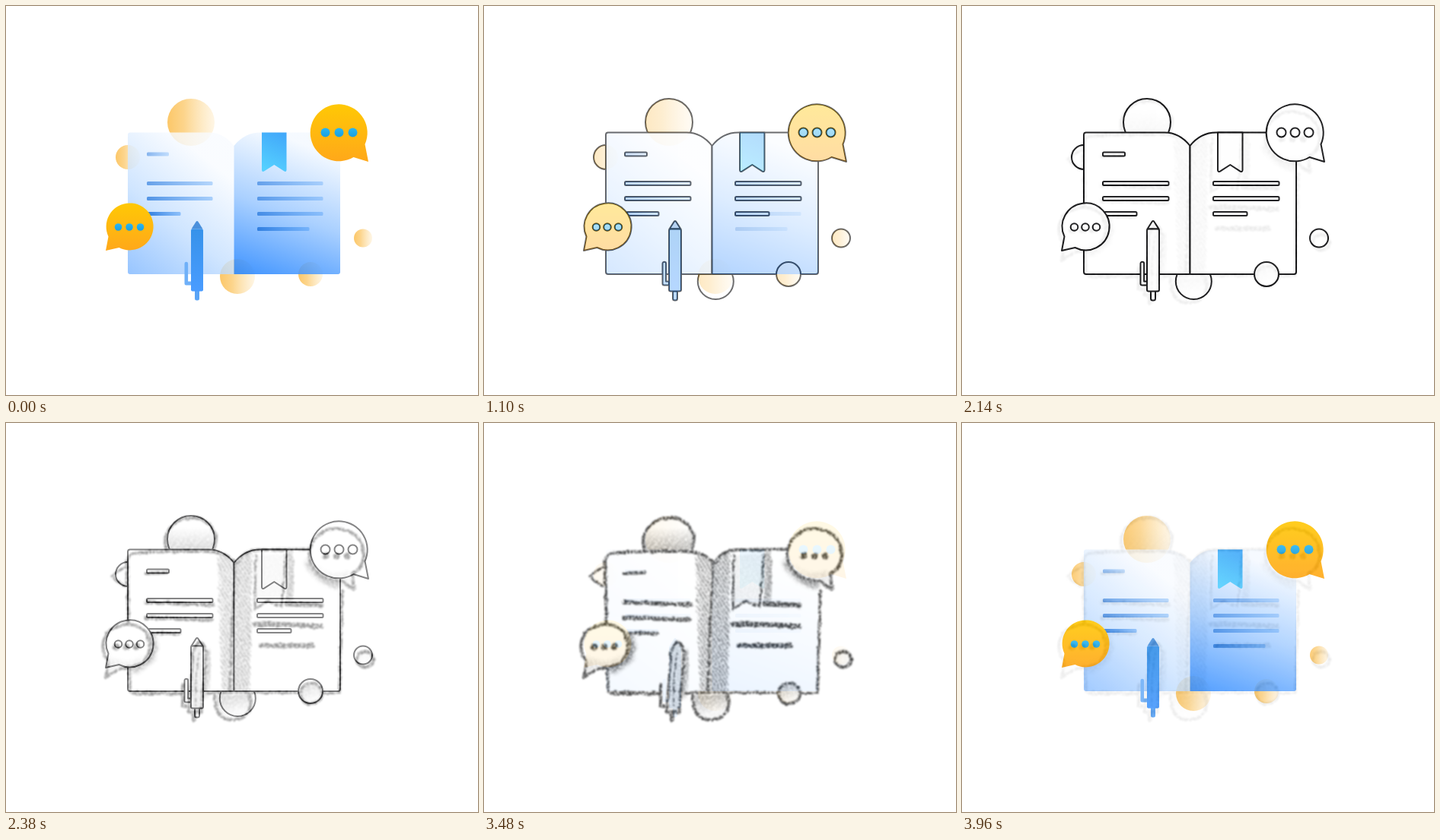
An HTML page that plays this animation: 620x512 px, repeating every 4.02 s.

```html
<!DOCTYPE html>
<html lang="en">
<head>
<meta charset="utf-8">
<title>Notebook: colour, outline, pencil</title>
<style>
  html, body { margin: 0; width: 100%; height: 100%; overflow: hidden; background: #fff; }
  svg { display: block; width: 100vw; height: 100vh; }
  .bg { fill: #fff; stroke: none; }

  #outline, #pencil { animation: 4020ms linear infinite; }
  #outline { animation-name: outline; }
  #pencil { animation-name: pencil; }

  /* each dissolve: nine 60 ms steps from 10% to 90% */
  @keyframes outline {
    0% { opacity: 0; }
    19.9% { opacity: 0; animation-timing-function: steps(9, jump-both); }
    33.333% { opacity: 1; }
    70% { opacity: 1; animation-timing-function: step-end; }
    70.01%, 100% { opacity: 0; }
  }
  @keyframes pencil {
    0% { opacity: 0; }
    53.233% { opacity: 0; animation-timing-function: steps(9, jump-both); }
    66.666% { opacity: 1; }
    86.567% { opacity: 1; animation-timing-function: steps(9, jump-both); }
    100% { opacity: 0; }
  }

  #outline { fill: #fff; stroke: #0c0c0e; stroke-width: 2; stroke-linejoin: round; }
  #pencil { fill: #fff; stroke: #2b2b2b; stroke-width: 4; stroke-linecap: round; stroke-linejoin: round; }
  #pencil .open { fill: none; }
  #pencil .dots { fill: #2b2b2b; stroke: none; }
  #pencil .tone { fill: #777; stroke: none; }
  #pencil .shade { fill: none; stroke: #4a4a4a; }
</style>
</head>
<body>
<svg viewBox="0 0 620 512">
  <defs>
    <linearGradient id="sun">
      <stop stop-color="#fcc768"/><stop offset=".35" stop-color="#fcd285" stop-opacity=".95"/>
      <stop offset="1" stop-color="#fde0a8" stop-opacity=".3"/>
    </linearGradient>
    <linearGradient id="paperL" gradientUnits="userSpaceOnUse" x1="165" y1="358" x2="280" y2="215">
      <stop stop-color="#7db6ff"/><stop offset=".5" stop-color="#c4dfff"/><stop offset="1" stop-color="#f8fbff"/>
    </linearGradient>
    <linearGradient id="paperR" gradientUnits="userSpaceOnUse" x1="322" y1="356" x2="386" y2="180">
      <stop stop-color="#2384ff"/><stop offset=".5" stop-color="#9bc8ff"/><stop offset="1" stop-color="#f4f9ff"/>
    </linearGradient>
    <linearGradient id="bar">
      <stop stop-color="#2878dc"/><stop offset="1" stop-color="#4a9af5" stop-opacity=".55"/>
    </linearGradient>
    <linearGradient id="amber" x2="0" y2="1">
      <stop stop-color="#ffc805"/><stop offset="1" stop-color="#ffa81a"/>
    </linearGradient>
    <linearGradient id="ribbon" x1=".7" x2=".4" y2="1">
      <stop stop-color="#42a9fa"/><stop offset="1" stop-color="#55d0ff"/>
    </linearGradient>
    <linearGradient id="ink" x2="0" y2="1">
      <stop stop-color="#3692ea"/><stop offset="1" stop-color="#4a9cff"/>
    </linearGradient>
    <linearGradient id="aqua" x2="0" y2="1">
      <stop stop-color="#27b6f4"/><stop offset="1" stop-color="#1c9fdc"/>
    </linearGradient>
    <linearGradient id="dusk" x2="0" y2="1">
      <stop offset=".3" stop-color="#fff"/><stop offset="1" stop-color="#a5a5a5"/>
    </linearGradient>
    <linearGradient id="dawn" x2=".3" y2="1">
      <stop stop-color="#8f8f8f"/><stop offset=".8" stop-color="#f2f2f2"/>
    </linearGradient>
    <pattern id="hatch" width="4" height="9" patternUnits="userSpaceOnUse" patternTransform="rotate(-32)">
      <path d="M1.6 0V9" stroke="#555" stroke-width="1.3"/>
    </pattern>

    <path id="pageL" d="M299.5 184C290 172 279 166.500 266 166.500H163a3 3 0 0 0-3 3V350a3 3 0 0 0 3 3H299.500Z"/>
    <path id="pageR" d="M299.500 184C309 172 321 166.500 334 166.500H436a3 3 0 0 1 3 3V350a3 3 0 0 1-3 3H299.500Z"/>
    <path id="mark" d="M336 166.500H368.500V216q-.3 3-3 1.600L352.300 209 339 217.600q-2.700 1.400-3-1.600Z"/>
    <path id="bubbleR" d="M471.500 182L476 205 456.500 199A37.500 37.500 0 1 1 471.500 182Z"/>
    <path id="bubbleL" d="M134.500 303.500L131 322 148.500 318A31 31 0 1 0 134.500 303.500Z"/>
    <g id="dotsR"><circle cx="419.500" cy="166.500" r="6"/><circle cx="437.500" cy="166.500" r="6"/><circle cx="455.500" cy="166.500" r="6"/></g>
    <g id="dotsL"><circle cx="147.500" cy="291" r="4.800"/><circle cx="162" cy="291" r="4.800"/><circle cx="176.500" cy="291" r="4.800"/></g>
    <path id="clip" d="M234.500 339a2.300 2.300 0 0 1 4.600 0V362.500H243V367.500H236.500a2 2 0 0 1-2-2Z"/>
    <path id="nub" d="M248 375H254V385a2.500 2.500 0 0 1-2.500 2.500h-1a2.500 2.500 0 0 1-2.500-2.500Z"/>
    <path id="tip" d="M243.500 293.500L249.500 284q1.500-2 3 0L258.500 293.500Z"/>
    <rect id="body" x="243" y="293.500" width="16" height="82" rx="2"/>
    <rect id="long" width="86.500" height="5" rx="1.500"/>
    <rect id="mid" width="44.500" height="5" rx="1.500"/>
    <rect id="short" width="29" height="5" rx="1.500"/>

    <filter id="graphite" filterUnits="userSpaceOnUse" x="110" y="105" width="395" height="305" color-interpolation-filters="sRGB">
      <feTurbulence type="fractalNoise" baseFrequency=".11" numOctaves="2" seed="4" result="warp"/>
      <feDisplacementMap in="SourceGraphic" in2="warp" scale="4" xChannelSelector="R" yChannelSelector="G" result="line"/>
      <feTurbulence type="fractalNoise" baseFrequency=".45" numOctaves="2" seed="9"/>
      <feColorMatrix values="0 0 0 0 1  0 0 0 0 1  0 0 0 0 1  0 0 0 4 -1.800" result="grain"/>
      <feMerge><feMergeNode in="line"/><feMergeNode in="grain"/></feMerge>
      <feGaussianBlur stdDeviation=".8"/>
    </filter>
    <filter id="soft" x="-60%" y="-30%" width="220%" height="160%"><feGaussianBlur stdDeviation="2.500"/></filter>
  </defs>

  <g id="colour">
    <rect class="bg" width="620" height="512"/>
    <g fill="url(#sun)">
      <circle cx="243" cy="153" r="31"/>
      <circle cx="160" cy="199" r="16"/>
      <circle cx="304" cy="356" r="23"/>
      <circle cx="400" cy="353" r="16"/>
      <circle cx="469" cy="305.500" r="12"/>
    </g>
    <use href="#pageL" fill="url(#paperL)" opacity=".8"/>
    <use href="#pageR" fill="url(#paperR)" opacity=".85"/>
    <use href="#mark" fill="url(#ribbon)"/>
    <g fill="url(#bar)">
      <use href="#short" x="185" y="192.500" opacity=".5"/>
      <use href="#long" x="185" y="231" opacity=".65"/>
      <use href="#long" x="185" y="251" opacity=".75"/>
      <use href="#mid" x="185" y="271" opacity=".95"/>
      <use href="#long" x="330" y="231" opacity=".6"/>
      <use href="#long" x="330" y="251" opacity=".65"/>
      <use href="#long" x="330" y="271" opacity=".75"/>
      <rect x="330" y="291" width="68.500" height="5" rx="1.500" opacity=".9"/>
    </g>
    <use href="#clip" fill="#6fb0f8"/>
    <use href="#nub" fill="#5aa4f6"/>
    <use href="#tip" fill="#4a90dc"/>
    <use href="#body" fill="url(#ink)"/>
    <g fill="url(#amber)"><use href="#bubbleR"/><use href="#bubbleL"/></g>
    <g fill="url(#aqua)"><use href="#dotsR"/><use href="#dotsL"/></g>
  </g>

  <g id="outline">
    <rect class="bg" width="620" height="512"/>
    <circle cx="243" cy="153" r="31"/>
    <circle cx="160" cy="199" r="16"/>
    <circle cx="304.300" cy="362.500" r="23.500"/>
    <use href="#pageL"/>
    <use href="#pageR"/>
    <circle cx="400" cy="353" r="16"/>
    <circle cx="469" cy="305.500" r="12"/>
    <use href="#mark"/>
    <use href="#short" x="185" y="192.500"/>
    <use href="#long" x="185" y="231"/>
    <use href="#long" x="185" y="251"/>
    <use href="#mid" x="185" y="271"/>
    <use href="#long" x="330" y="231"/>
    <use href="#long" x="330" y="251"/>
    <use href="#mid" x="330" y="271"/>
    <use href="#clip"/>
    <use href="#nub"/>
    <use href="#tip"/>
    <use href="#body"/>
    <use href="#bubbleR"/>
    <use href="#bubbleL"/>
    <use href="#dotsR"/>
    <use href="#dotsL"/>
  </g>

  <g id="pencil">
    <rect class="bg" width="620" height="512"/>
    <g filter="url(#graphite)">
      <path fill="url(#dusk)" d="M211 167C203 145 222 125 243 125C266 124 281 143 274 167"/>
      <path d="M158 190C149 192 143 199 139 202C145 206 148 214 158 215" stroke-width="3"/>
      <path fill="url(#dawn)" d="M274 358C272 378 283 391 298 391C312 391 321 382 321 368L319 358"/>
      <path class="bg" d="M160 178Q163 171 175 170H265Q288 170 302 183Q312 168 330 167H441L440 356H163Z"/>

      <path class="tone" opacity=".22" d="M282 173L302 183 296 354H285Z"/>
      <path class="tone" opacity=".32" d="M303 183L322 169 319 354H296Z"/>
      <path fill="url(#hatch)" stroke="none" d="M277 172L302 183 295 354H283ZM303 183L324 169 321 354H296Z"/>
      <path class="shade" filter="url(#soft)" opacity=".65" stroke-width="10" d="M374 174Q377 200 371 232"/>

      <path class="open" d="M163 354L159 182Q161 172 172 171C205 168 240 169 265 169Q290 171 302 183"/>
      <path class="open" d="M304 184Q312 168 332 167L402 166M442 222L438 355"/>
      <path class="open" stroke-width="3.500" d="M301 183L297 270 294 354"/>
      <path class="open" stroke-width="5" d="M167 355L232 356"/>
      <path class="open" stroke-width="3" d="M264 355L388 355M414 355L440 356"/>

      <path fill="#eee" stroke-width="3" d="M328 174L327 245 345 234 362 242 368 173"/>
      <path class="open" stroke-width="4.500" d="M184 198L211 197M190 276L228 277"/>
      <path class="open" stroke-width="5.500" d="M184 236Q230 238 272 239M184 256Q230 258 269 259"/>
      <path class="open" stroke-width="6.500" d="M369 238L414 240M326 265Q370 264 414 268M335 293H402"/>

      <path class="shade" filter="url(#soft)" opacity=".75" stroke-width="9" d="M398 184Q410 207 436 213"/>
      <path d="M440 207C418 209 398 192 398 173C399 152 416 139 435 139C455 139 470 154 470 173C470 184 464 193 455 199L457 219Z"/>
      <path class="tone" opacity=".25" filter="url(#soft)" d="M405 184Q422 205 450 195L456 214 438 203Q418 205 405 184Z"/>
      <g class="dots"><circle cx="420" cy="175" r="4.500"/><circle cx="434" cy="175" r="4.500"/><circle cx="448" cy="175" r="4.500"/></g>

      <path class="shade" filter="url(#soft)" opacity=".85" stroke-width="9" d="M191 282Q201 312 168 324"/>
      <path d="M134 314C126 305 125 288 133 277C143 263 168 261 180 272C193 285 191 306 178 316C171 321 160 323 152 322L131 335Z"/>
      <path class="tone" opacity=".25" filter="url(#soft)" d="M134 306Q155 322 182 306L176 317 150 321 134 332Z"/>
      <g class="dots"><circle cx="145" cy="295" r="4.500"/><circle cx="158" cy="295" r="4.500"/><circle cx="172" cy="294" r="4.500"/></g>

      <path class="shade" filter="url(#soft)" opacity=".7" stroke-width="7" d="M265 303Q266 330 260 358"/>
      <path class="open" d="M232 344V372L240 374"/>
      <path class="open" stroke-width="6" d="M247 383V390"/>
      <path fill="#d9d9d9" stroke-width="3.500" d="M240 380L246 300Q251 289 255 288Q261 292 263 302L256 381Z"/>
      <path class="open" stroke-width="1.500" d="M253 302L248 372M244 352L259 354"/>

      <circle cx="401" cy="356" r="14" fill="url(#dawn)"/>
      <circle cx="472" cy="311" r="10.500" fill="#f4f4f4"/>
    </g>
  </g>
</svg>
</body>
</html>
```
